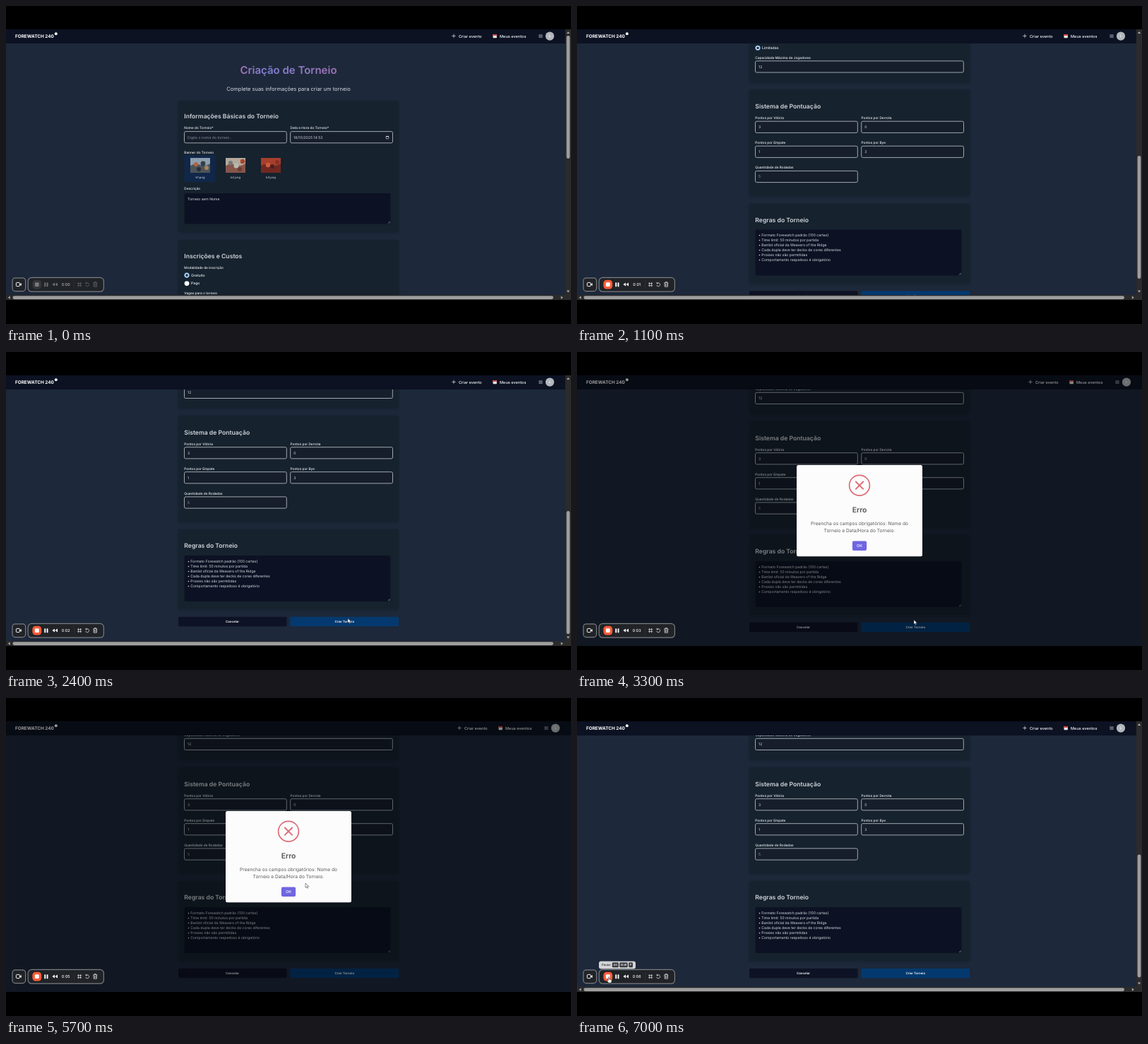
Animation of 800x450 px, one loop 7100 ms. Source, as an HTML page:

```html
<!DOCTYPE html>
<html lang="pt">
<head>
<meta charset="utf-8">
<title>Criação de Torneio</title>
<style>
  html, body { margin: 0; width: 100%; height: 100%; overflow: hidden; background: #000; }
  svg { display: block; width: 100vw; height: 100vh; }
  text { font-family: Inter, "Open Sans", sans-serif; text-rendering: geometricPrecision; white-space: pre; }
</style>
</head>
<body>
<svg id="stage" viewBox="0 0 800 450"></svg>
<script>
const LOOP = 7100, STEP = 100;

// Drawing helpers; text is placed by the middle of its capitals.
const text = (x, y, str, size, fill = '#e8ebef', weight = 400, anchor = 'start') =>
  `<text x="${x}" y="${y + size * 0.36}" font-size="${size}" fill="${fill}" font-weight="${weight}" text-anchor="${anchor}">${str}</text>`;
const rect = (x, y, w, h, fill, r = 0, extra = '') =>
  `<rect x="${x}" y="${y}" width="${w}" height="${h}" rx="${r}" fill="${fill}" ${extra}/>`;
const line = (d, color, width = 1, extra = '') =>
  `<path d="${d}" fill="none" stroke="${color}" stroke-width="${width}" ${extra}/>`;
const dot = (x, y, r, fill, extra = '') => `<circle cx="${x}" cy="${y}" r="${r}" fill="${fill}" ${extra}/>`;

const card = (top, bottom) => rect(244, top, 312, bottom - top, '#18212f', 3, 'filter="url(#soft)"');
const heading = (y, str) => text(252.3, y, str, 8.65, '#d0d4da', 600);
const label = (x, y, str) => text(x, y, str, 4.75, '#eef0f3', 500);
const box = (x, y, w) => rect(x, y, w, 16.2, '#161e2c', 2, 'stroke="#c3c8cf" stroke-width=".8"');
const field = (x, y, name, value, w = 144.8, color = '#d3d7dd') =>
  label(x, y, name) + box(x + .2, y + 4.9, w) + text(x + 4.8, y + 13.1, value, 5.1, color);
const area = (top, bottom) => rect(252.5, top, 292, bottom - top, '#0c1223', 2) +
  line(`M541 ${bottom - 1}l2.8-2.8M542.6 ${bottom - 1}l1.2-1.2`, '#aeb4bd', .6);
const radio = (y, name, on) => dot(256, y, 3.4, '#fff', on ? 'stroke="#3b78c4" stroke-width=".7"' : '') +
  (on ? dot(256, y, 1.9, '#12376b') : '') + text(262, y, name, 5.1, '#eef0f3', 500);

const banner = (x, name, sky, ground, shapes) =>
  `<svg x="${x}" y="215" width="28" height="21" viewBox="0 0 28 21">` +
  rect(0, 0, 28, 21, sky) + `<path d="M0 11q7-4 14-1t14-2v13H0z" fill="${ground}"/>` + shapes + '</svg>' +
  text(x + 14, 242.3, name, 4.2, '#dfe3e8', 400, 'middle');

const rules = ['Formato Forewatch padrão (100 cartas)', 'Time limit: 50 minutos por partida',
  'Banlist oficial da Weavers of the Ridge', 'Cada dupla deve ter decks de cores diferentes',
  'Proxies não são permitidas', 'Comportamento respeitoso é obrigatório'];

const page =
  text(400, 91, 'Criação de Torneio', 15, 'url(#title)', 600, 'middle') +
  text(400, 117.5, 'Complete suas informações para criar um torneio', 7.5, '#d5d9e0', 400, 'middle') +
  card(134, 320) + heading(156, 'Informações Básicas do Torneio') +
  field(252.3, 172.7, 'Nome do Torneio*', 'Digite o nome do torneio...', 144.8, '#858d9a') +
  field(402.5, 172.7, 'Data e Hora do Torneio*', '18/10/2025 14:53') +
  rect(538.2, 184.4, 3.6, 3.4, 'none', .4, 'stroke="#dfe3e8" stroke-width=".6"') + rect(538, 184, 4, 1.1, '#dfe3e8') +
  label(252.3, 207.7, 'Banner do Torneio') + rect(252.3, 211, 44.5, 38, '#10274a', 2) +
  banner(261, 'b1.png', '#8d9fae', '#4d5358', dot(8, 9, 3, '#b5623f') + dot(18, 8, 3.4, '#353d45') + dot(23, 14, 3, '#a8845f') + dot(12, 16, 3, '#272e36')) +
  banner(311, 'b2.png', '#b4a99b', '#85564a', dot(7, 7, 3, '#717a7c') + dot(15, 11, 3.5, '#b9b9ae') + dot(24, 5, 3.3, '#a94632') + dot(20, 16, 3, '#6b3c35')) +
  banner(361, 'b3.png', '#a63f2c', '#712820', dot(10, 10, 3.2, '#cc5d3a') + dot(16, 12, 3, '#492020') + dot(23, 6, 3, '#8c3023')) +
  label(252.3, 258.2, 'Descrição') + area(265, 308.5) + text(257, 273, 'Torneio sem Nome', 5.1, '#dfe3e8') +
  card(331, 477.5) + heading(353.6, 'Inscrições e Custos') +
  label(252.3, 370, 'Modalidade de inscrição') + radio(381, 'Gratuito', true) + radio(392.6, 'Pago') +
  label(252.3, 406, 'Vagas para o torneio') + radio(417.5, 'Ilimitadas') + radio(428.8, 'Limitadas', true) +
  field(252.3, 442.4, 'Capacidade Máxima de Jogadores', '12', 294.8) +
  card(488, 638.5) + heading(511.5, 'Sistema de Pontuação') +
  field(252.3, 527.8, 'Pontos por Vitória', '3') + field(402.5, 527.8, 'Pontos por Derrota', '0') +
  field(252.3, 562.8, 'Pontos por Empate', '1') + field(402.5, 562.8, 'Pontos por Bye', '3') +
  field(252.3, 598, 'Quantidade de Rodadas', '5', 144.8, '#949ba6') +
  card(649, 762.3) + heading(672, 'Regras do Torneio') + area(686, 751) +
  rules.map((rule, i) => text(257, 693.7 + i * 7.06, '• ' + rule, 5.1, '#d9dde3')).join('') +
  rect(244, 772.8, 153.6, 13.4, '#0d1324', 1.5) + text(320.5, 779.6, 'Cancelar', 4.4, '#fff', 600, 'middle') +
  rect(402.4, 772.8, 153.6, 13.4, '#04396f', 1.5) + text(479.3, 779.6, 'Criar Torneio', 4.4, '#fff', 600, 'middle');

const header = rect(0, 33, 800, 20, '#0c1222') +
  text(13, 42.8, 'FOREWATCH 240', 6.4, '#fff', 700) + dot(70.8, 39.2, 2, '#fff') +
  `<g id="nav">` + line('M631.3 42.4h5.4M634 39.7v5.4', '#e8ebef', .7) +
  text(641, 42.6, 'Criar evento', 5.6, '#f3f5f7', 500) +
  rect(689.5, 40, 5.4, 5.2, '#e9e4e2', .6) + rect(689.5, 40, 5.4, 1.9, '#d6493f', .5) +
  text(699, 42.6, 'Meus eventos', 5.6, '#f3f5f7', 500) +
  line('M754.3 40.9h5.4M754.3 42.6h5.4M754.3 44.3h5.4', '#c5cad1', .7) +
  dot(770, 42.6, 6.1, '#b4b8be') + text(770, 42.7, 'L', 4.8, '#fff', 500, 'middle') + '</g>';

const scrollbars = `<g id="bars">` + rect(792, 33, 8, 383, '#2b2b2b') + rect(0, 409, 800, 7, '#2b2b2b') +
  rect(9.5, 410.3, 765.5, 4.6, '#9e9e9e', 2.3) + rect(793.6, 0, 4.8, 174, '#9e9e9e', 2.4, 'id="thumb"') +
  '<path d="M793.8 39l2.2-3 2.2 3zM793.8 402.5l2.2 3 2.2-3zM5.8 410.4l-3 2.2 3 2.2zM785.8 410.4l3 2.2-3 2.2z" fill="#a8a8a8"/></g>';

const dialog = rect(0, 33, 800, 383, '#000', 0, 'id="shade"') + `<g id="dialog">` +
  rect(311, 160, 178, 129.3, '#fcfcfd', 2.5) +
  dot(400, 188.7, 14.4, 'none', 'stroke="#dd6d76" stroke-width="1.7"') +
  line('M394.3 183l11.4 11.4M405.7 183l-11.4 11.4', '#dd6d76', 1.9) +
  text(400, 223.7, 'Erro', 10.4, '#545454', 600, 'middle') +
  text(400, 242.9, 'Preencha os campos obrigatórios: Nome do', 6.65, '#595959', 400, 'middle') +
  text(400, 252.4, 'Torneio e Data/Hora do Torneio.', 6.65, '#595959', 400, 'middle') +
  rect(389.9, 267.4, 20.2, 13.6, '#7066e0', 2) + text(400, 274.3, 'OK', 5.4, '#fff', 500, 'middle') + '</g>';

const frame = 'stroke="#7b7d80" stroke-width="1.2"';
const recorder = rect(9, 384.8, 18.6, 18.8, '#202327', 4, frame) +
  rect(14.4, 391.4, 5, 5.2, 'none', 1, 'stroke="#fff" stroke-width="1"') + '<path d="M19.8 393.6l2-1.5v4l-2-1.5z" fill="#fff"/>' +
  rect(31.2, 384.4, 107.2, 19.8, '#202327', 5, frame) +
  rect(37.4, 387.8, 12.8, 12.8, '#f95b38', 4.5, 'id="stop"') + rect(40.9, 391.3, 5.8, 5.8, '#fff', 1, 'id="square"') +
  '<g id="tools">' + rect(54.3, 391.2, 1.9, 6, '#fff', .5) + rect(57.6, 391.2, 1.9, 6, '#fff', .5) +
  '<path d="M69 391.6v5l-3.6-2.5zM73 391.6v5l-3.6-2.5z" fill="#fff"/>' +
  line('M102.6 391v6.2M105.6 391v6.2M101 392.6h6.2M101 395.6h6.2', '#e3e3e3', .7) +
  line('M113.2 392.6a2.5 2.5 0 1 1-.5 2.4M113 390.8v2h2', '#e3e3e3', .8) +
  line('M123.4 391.8h5.8M125.2 391.6v-1h2.2v1M124 392l.3 5.2h4l.3-5.2M125.6 393.4v2.4M127 393.4v2.4', '#e3e3e3', .8) + '</g>' +
  line('M96.4 388v12', '#34373b', .6) +
  `<text id="clock" x="84.7" y="396" font-size="5.4" font-weight="500" text-anchor="middle" fill="#fff"></text>`;

const key = (x, w, str) => rect(x, 374.3, w, 7, '#3a3c40', 1.4) + text(x + w / 2, 377.8, str, 4.1, '#fff', 500, 'middle');
const tooltip = '<g id="tip">' + rect(31, 372.4, 52, 10.8, '#d3d4d6', 3) + text(35, 377.8, 'Pause', 4.3, '#2a2c30', 500) +
  key(49.8, 9, 'Alt') + key(60.2, 11.6, 'Shift') + key(73.2, 5.8, 'P') + '</g>';

const cursors = '<g id="mouse"><path id="arrow" d="M0 0v6.3l1.5-1.3 1 2.2 1.1-.5-1-2.1h2z" fill="#fff" stroke="#222" stroke-width=".5"/>' +
  '<path id="hand" d="M-.8 0q.9-.7 1.5 0v3l2.9.7q.7.3.5 1.4L3.5 8H-.4l-2.2-3q.3-1 1.8 0z" fill="#fff" stroke="#222" stroke-width=".5"/></g>';

const stops = [[0, '#a273b4'], [.28, '#7d7fd4'], [.6, '#8f79c4'], [1, '#9f72b4']]
  .map(([at, color]) => `<stop offset="${at}" stop-color="${color}"/>`).join('');

document.getElementById('stage').innerHTML =
  `<defs><linearGradient id="title">${stops}</linearGradient>
   <filter id="soft" x="-5%" y="-10%" width="110%" height="120%"><feDropShadow dx="0" dy="1" stdDeviation="2.5" flood-opacity=".22"/></filter>
   <clipPath id="view">${rect(0, 33, 800, 383, '#000')}</clipPath></defs>` +
  rect(0, 0, 800, 450, '#000') +
  `<g clip-path="url(#view)">${rect(0, 33, 800, 383, '#1d283a')}<g id="page">${page}</g>${header}${scrollbars}${dialog}</g>` +
  recorder + tooltip + cursors;

// Motion tables: [time, ...values]
const SCROLL = [[100, 0], [300, 60], [600, 280], [800, 385], [900, 390], [1100, 369.5], [1400, 346], [1900, 346], [2200, 390], [2300, 398], [2900, 398], [3000, 390]];
const MOUSE = [[2000, 560, 330], [2400, 484, 377], [2700, 477, 379], [3500, 477, 379], [4100, 450, 236], [4300, 450, 236],
  [4650, 379, 283], [5000, 448, 241], [5100, 450, 240], [5350, 450, 240], [5700, 424, 262], [5900, 402, 273], [6100, 402, 273], [6800, 45, 395]];
const SHADE = [[2900, 0], [3100, .4], [6000, .4], [6200, 0]];
const POPUP = [[2900, .7, 0], [3000, .9, .7], [3100, 1.04, 1], [3200, .98, 1], [3300, 1, 1], [6000, 1, 1], [6200, .5, 0]];
const TIP = [[6700, 0], [7000, 1]];

const smooth = k => k * k * (3 - 2 * k);
function track(table, t, ease = k => k) {
  const i = table.findIndex(row => row[0] > t);
  if (i < 0) return table[table.length - 1].slice(1);
  if (i === 0) return table[0].slice(1);
  const [a, b] = [table[i - 1], table[i]];
  const k = ease((t - a[0]) / (b[0] - a[0]));
  return a.slice(1).map((v, n) => v + (b[n + 1] - v) * k);
}

const set = (id, attrs) => {
  const el = document.getElementById(id);
  for (const name in attrs) el.setAttribute(name, attrs[name]);
};

function draw(t) {
  const [scroll] = track(SCROLL, t);
  const [x, y] = track(MOUSE, t, smooth);
  const [size, alpha] = track(POPUP, t);
  const locked = t >= 3000 && t < 6200, recording = t >= 100, pointing = t >= 6700;
  set('page', { transform: `translate(0 ${-scroll})` });
  set('thumb', { y: 42 + scroll * .46 });
  set('nav', { transform: `translate(${locked ? 8 : 0} 0)` });
  set('bars', { opacity: locked ? 0 : 1 });
  set('shade', { opacity: track(SHADE, t)[0] });
  set('dialog', { opacity: alpha, transform: `translate(400 224.6) scale(${size}) translate(-400 -224.6)` });
  set('stop', { fill: recording ? '#f95b38' : '#33363a' });
  set('square', { fill: recording ? '#fff' : '#77797c' });
  set('tools', { opacity: recording ? 1 : .35 });
  set('clock', { fill: recording ? '#fff' : '#b5b7ba' });
  document.getElementById('clock').textContent = '0:0' + Math.max(0, Math.floor((t - 100) / 1000));
  set('tip', { opacity: track(TIP, t)[0] });
  set('mouse', { transform: `translate(${x} ${y})`, opacity: t >= 2100 ? 1 : 0 });
  set('arrow', { opacity: pointing ? 0 : 1 });
  set('hand', { opacity: pointing ? 1 : 0 });
}

const start = performance.now();
function tick() {
  const t = (performance.now() - start) % LOOP;
  draw(Math.floor(t / STEP) * STEP);
  requestAnimationFrame(tick);
}
tick();
</script>
</body>
</html>
```
